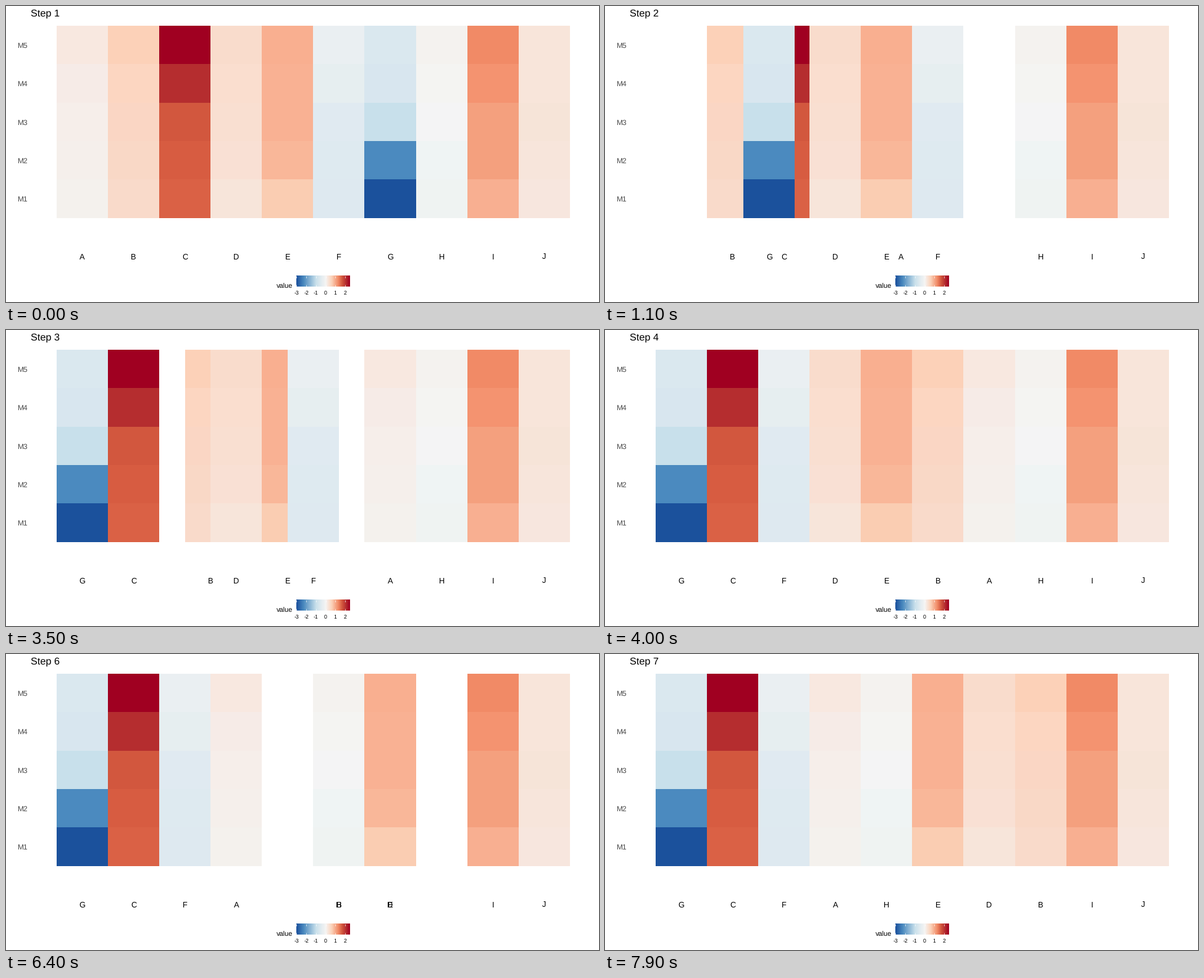
Write a matplotlib script that moves like this. It is 960 px wide and 480 px high and loops after 8000 ms.

```python
import matplotlib.pyplot as plt
from matplotlib.animation import FuncAnimation
from matplotlib.colors import LinearSegmentedColormap
from matplotlib.patches import Rectangle
import numpy as np

WIDTH, HEIGHT, DPI = 960, 480, 100
FRAMES, INTERVAL = 80, 100
LEFT, COL_W = 81.9, 83.1
TOP, ROW_H = 32, 62.3

# Cell colours per column, from M5 down to M1
COLUMNS = {
    "A": "F8E8E0 F6EBE7 F6EEEA F5EFEB F4F1ED",
    "B": "FCD1B8 FCD6C1 FAD6C4 F9D8C6 F9DACA",
    "C": "A00021 B52D2F D2573E D75C41 DA6145",
    "D": "F9DCCC FADECF F9DFD1 F9E0D4 F7E5DA",
    "E": "F9AF90 F9B193 F9B193 F9B799 FACDB2",
    "F": "EAEFF2 E6EEF0 E0EAF1 DEEAF0 DEE9F0",
    "G": "DAE8EF D8E6EF C8E0EB 4B8ABF 1B519C",
    "H": "F4F2EF F4F4F2 F4F4F5 EFF4F4 EFF3F2",
    "I": "F18A66 F49370 F4A07E F4A07E F8AF91",
    "J": "F8E5DA F8E5DA F6E4D8 F7E5DB F7E6DE",
}

# Each move swaps two columns: (pair, last resting frame, steps)
MOVES = [("AG", 6, 7), ("BC", 20, 7), ("BF", 34, 6),
         ("AD", 47, 6), ("EH", 60, 6), ("BE", 73, 6)]

LEGEND_STOPS = [(-3, "#1B519C"), (-2.25, "#4B8ABF"), (-1, "#C8E0EB"),
                (0, "#F6F5F4"), (0.65, "#FCD1B8"), (1.3, "#F18A66"),
                (1.7, "#D2573E"), (2.1, "#B52D2F"), (2.5, "#A00021")]

plt.rcParams["font.family"] = "Liberation Sans"
plt.rcParams["text.hinting"] = "none"

fig = plt.figure(figsize=(WIDTH / DPI, HEIGHT / DPI), dpi=DPI, facecolor="white")
ax = fig.add_axes([0, 0, 1, 1])


def put_text(x, baseline, text, px, ha="center", color="black"):
    return ax.text(x, baseline, text, fontsize=px * 72 / DPI, ha=ha,
                   va="baseline", color=color)


def draw_legend():
    x0, x1, y0, y1 = 470.4, 556.6, 438, 455.4
    unit = 15.7
    span = LEGEND_STOPS[-1][0] - LEGEND_STOPS[0][0]
    stops = [((v - LEGEND_STOPS[0][0]) / span, c) for v, c in LEGEND_STOPS]
    cmap = LinearSegmentedColormap.from_list("scale", stops)
    ax.imshow(np.linspace(0, 1, 256)[None, :], cmap=cmap, aspect="auto",
              extent=(x0, x1, y1, y0), interpolation="bilinear")
    tick = (y1 - y0) / 5
    for value in range(-3, 3):
        x = x0 + (value + 3) * unit
        for y in (y0, y1 - tick):
            ax.plot([x, x], [y, y + tick], color="white", lw=0.5,
                    solid_capstyle="butt")
        put_text(x, 468, str(value), 8.8)
    put_text(438, 458, "value", 11, ha="left")


def progress(frame, start, steps):
    return min(max((frame - start) / steps, 0), 1)


def layout(frame):
    """Slot of every column and the number of the nearest step."""
    slots = {name: i for i, name in enumerate(COLUMNS)}
    step = 1
    for (a, b), start, steps in MOVES:
        t = progress(frame, start, steps)
        slots[a], slots[b] = (slots[a] + (slots[b] - slots[a]) * t,
                              slots[b] + (slots[a] - slots[b]) * t)
        step += t >= 0.5
        if t < 1:
            break
    return slots, step


draw_legend()
title = put_text(40, 17, "", 16.2, ha="left")
row_edges = [round(TOP + ROW_H * i) for i in range(6)]
for i in range(5):
    put_text(35, TOP + ROW_H * (i + 0.5) + 4.7, f"M{5 - i}", 12,
             ha="right", color="#4D4D4D")

cells, labels = {}, {}
for name, colors in COLUMNS.items():
    cells[name] = [
        ax.add_patch(Rectangle((0, y0), COL_W, y1 - y0, facecolor="#" + color,
                               linewidth=0, antialiased=False))
        for color, y0, y1 in zip(colors.split(), row_edges, row_edges[1:])]
    labels[name] = put_text(0, 411, name, 12.8)

ax.set_xlim(0, WIDTH)
ax.set_ylim(HEIGHT, 0)
ax.axis("off")


def update(frame):
    slots, step = layout(frame)
    title.set_text(f"Step {step}")
    for name, slot in slots.items():
        x = LEFT + COL_W * slot
        left, right = round(x), round(x + COL_W)
        for cell in cells[name]:
            cell.set_x(left)
            cell.set_width(right - left)
        labels[name].set_x(x + COL_W / 2)
    return []


anim = FuncAnimation(fig, update, frames=FRAMES, interval=INTERVAL,
                     repeat=True, repeat_delay=0, blit=False)
plt.show()
```
